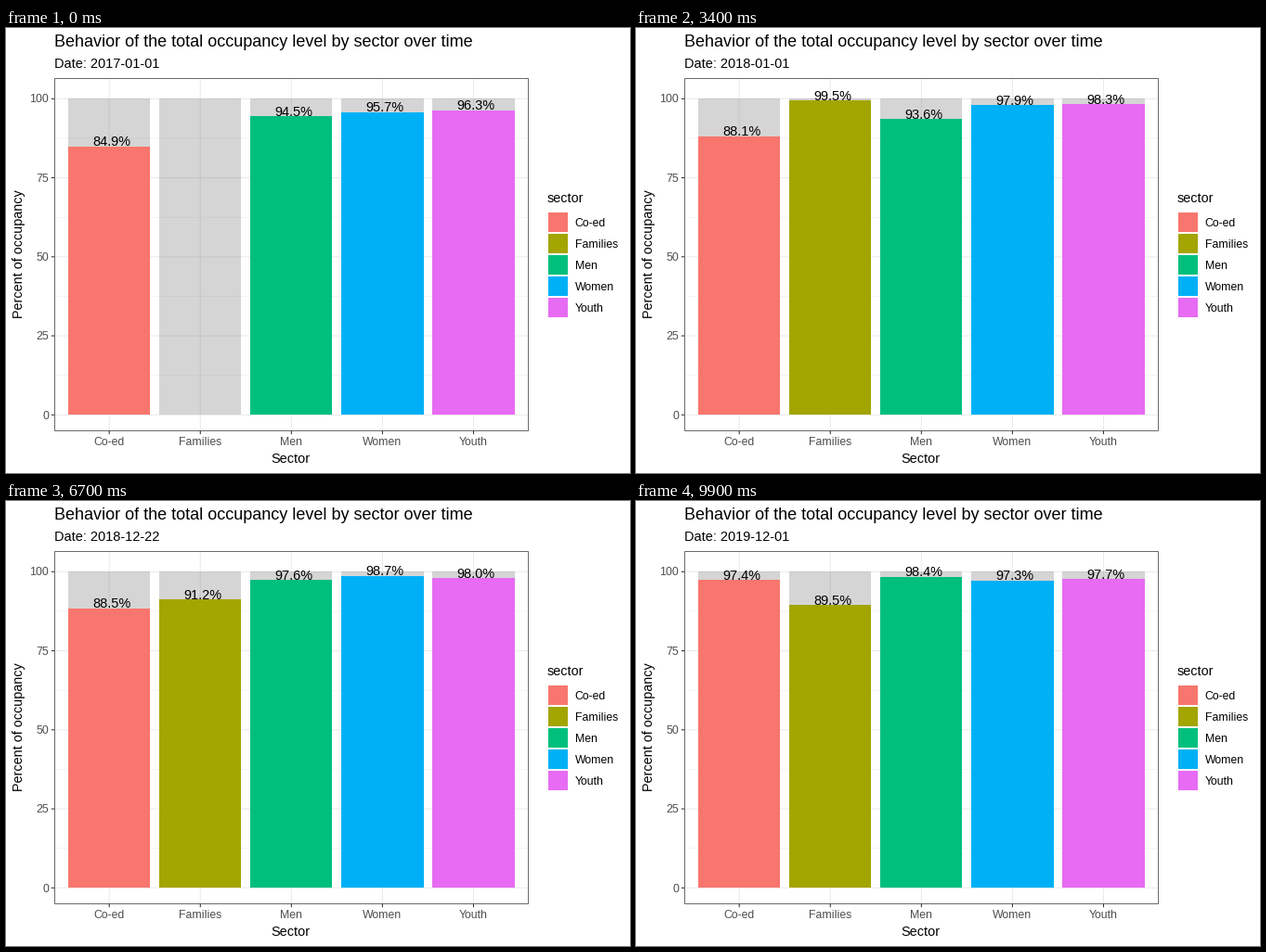
Write a matplotlib script that moves like this. It is 672x480 px and loops after 10000 ms.

```python
import numpy as np
import matplotlib.pyplot as plt
from matplotlib.animation import FuncAnimation
from matplotlib.patches import Rectangle

plt.rcParams["font.family"] = "Liberation Sans"

W, H, DPI = 672, 480, 96
PX = 72 / DPI
FRAMES, INTERVAL = 100, 100

LEFT, RIGHT, TOP, BOTTOM = 52.5, 562.5, 54.5, 434.5
UNIT = (RIGHT - LEFT) / 5.2
BAR_W = 0.9 * UNIT
ZERO, PER_POINT = 417.3, 3.41
INK, MUTED, GRID = "#333333", "#4D4D4D", "#EBEBEB"

# Sector: colour and the turning points of its trend as {month: percent}
SECTORS = {
    "Co-ed": ("#F8766D", {0: 84.9, 7: 82.0, 12: 88.1, 18: 87.4, 28: 89.3, 35: 97.4}),
    "Families": ("#A3A500", {12: 99.5, 18: 90.9, 24: 91.2, 28: 88.5, 35: 89.5}),
    "Men": ("#00BF7D", {0: 94.5, 7: 95.6, 12: 93.6, 18: 94.5, 24: 97.6, 35: 98.4}),
    "Women": ("#00B0F6", {0: 95.7, 7: 98.1, 12: 97.9, 18: 98.5, 28: 98.8, 35: 97.3}),
    "Youth": ("#E76BF3", {0: 96.3, 7: 97.1, 12: 98.3, 18: 96.9, 24: 98.0, 28: 95.8, 35: 97.7}),
}
MEN_GAP = 27  # month without a count for men

months = np.arange("2017-01", "2020-01", dtype="datetime64[M]").astype("datetime64[D]")
days = (months - months[0]).astype(int)
keys = np.round(days / days[-1] * (FRAMES - 1)).astype(int)


def monthly(trend):
    return np.interp(np.arange(len(months)), list(trend), list(trend.values()), left=np.nan)


def y_of(level):
    return ZERO - PER_POINT * level


fig = plt.figure(figsize=(W / DPI, H / DPI), dpi=DPI, facecolor="white")
ax = fig.add_axes([0, 0, 1, 1])
ax.set(xlim=(0, W), ylim=(H, 0))
ax.axis("off")


def text(x, y, s, px, color="black", **kw):
    return ax.text(x, y, s, fontsize=px * PX, color=color, va="baseline", zorder=6, **kw)


def line(x0, y0, x1, y1, color, px=1.07, z=1):
    ax.plot([x0, x1], [y0, y1], color=color, lw=px * PX,
            solid_capstyle="butt", snap=False, zorder=z)


def rect(x, y, w, h, color, z, **kw):
    return ax.add_patch(Rectangle((x, y), w, h, fc=color, lw=0, zorder=z, **kw))


# Horizontal grid with its ticks
for level in np.arange(12.5, 100, 25):
    line(LEFT, y_of(level), RIGHT, y_of(level), GRID, 0.53)
for level in range(0, 101, 25):
    y = y_of(level)
    line(LEFT, y, RIGHT, y, GRID)
    line(LEFT - 3.7, y, LEFT, y, INK, z=5)
    text(46, y + 4.2, str(level), 12.4, MUTED, ha="right")

ax.add_patch(Rectangle((LEFT, TOP), RIGHT - LEFT, BOTTOM - TOP, fill=False,
                       ec="#6A6A6A", lw=PX, snap=False, zorder=5))

# Titles
text(52, 20, "Behavior of the total occupancy level by sector over time", 17.95)
date = text(52, 43, "", 14.5)
text(306.8, 469, "Sector", 14.5, ha="center")
text(18, 244, "Percent of occupancy", 14.4, ha="center",
     rotation=90, rotation_mode="anchor")
text(583, 188, "sector", 14.4)

# One column and one legend row per sector
columns = []
for k, (name, (color, trend)) in enumerate(SECTORS.items()):
    x = LEFT - 0.15 + UNIT * (k + 0.6)
    line(x, TOP, x, BOTTOM, GRID)
    line(x, BOTTOM, x, BOTTOM + 3.7, INK, z=5)
    text(x, 450, name, 12.2, MUTED, ha="center")
    rect(x - BAR_W / 2, y_of(100), BAR_W, ZERO - y_of(100), "#595959", 2, alpha=0.25)

    top = 199.2 + 23.04 * k
    rect(584, top, 21, 21, color, 3)
    text(612.7, top + 15, name, 12.2)

    levels = monthly(trend)
    if name == "Men":
        levels[MEN_GAP] = np.nan
    bar = rect(x - BAR_W / 2, ZERO, BAR_W, 0, color, 3)
    columns.append((levels, bar, text(x + 2.4, ZERO, "", 14.5, ha="center")))


def update(i):
    date.set_text(f"Date: {months[0] + i * int(days[-1]) // (FRAMES - 1)}")
    k = np.searchsorted(keys, i, side="right") - 1
    # On a month's own frame there is nothing to blend towards
    nxt = k if i == keys[k] else k + 1
    t = (i - keys[k]) / max(keys[nxt] - keys[k], 1)
    for levels, bar, label in columns:
        level = levels[k] + t * (levels[nxt] - levels[k])
        shown = bool(np.isfinite(level))
        bar.set_visible(shown)
        label.set_visible(shown)
        if shown:
            y = y_of(level)
            bar.set_y(y)
            bar.set_height(ZERO - y)
            label.set_y(y - 0.5)
            label.set_text(f"{levels[nxt if t >= 0.5 else k]:.1f}%")
    return []


anim = FuncAnimation(fig, update, frames=FRAMES, interval=INTERVAL,
                     init_func=lambda: update(0), repeat=True, repeat_delay=0)
plt.show()
```
